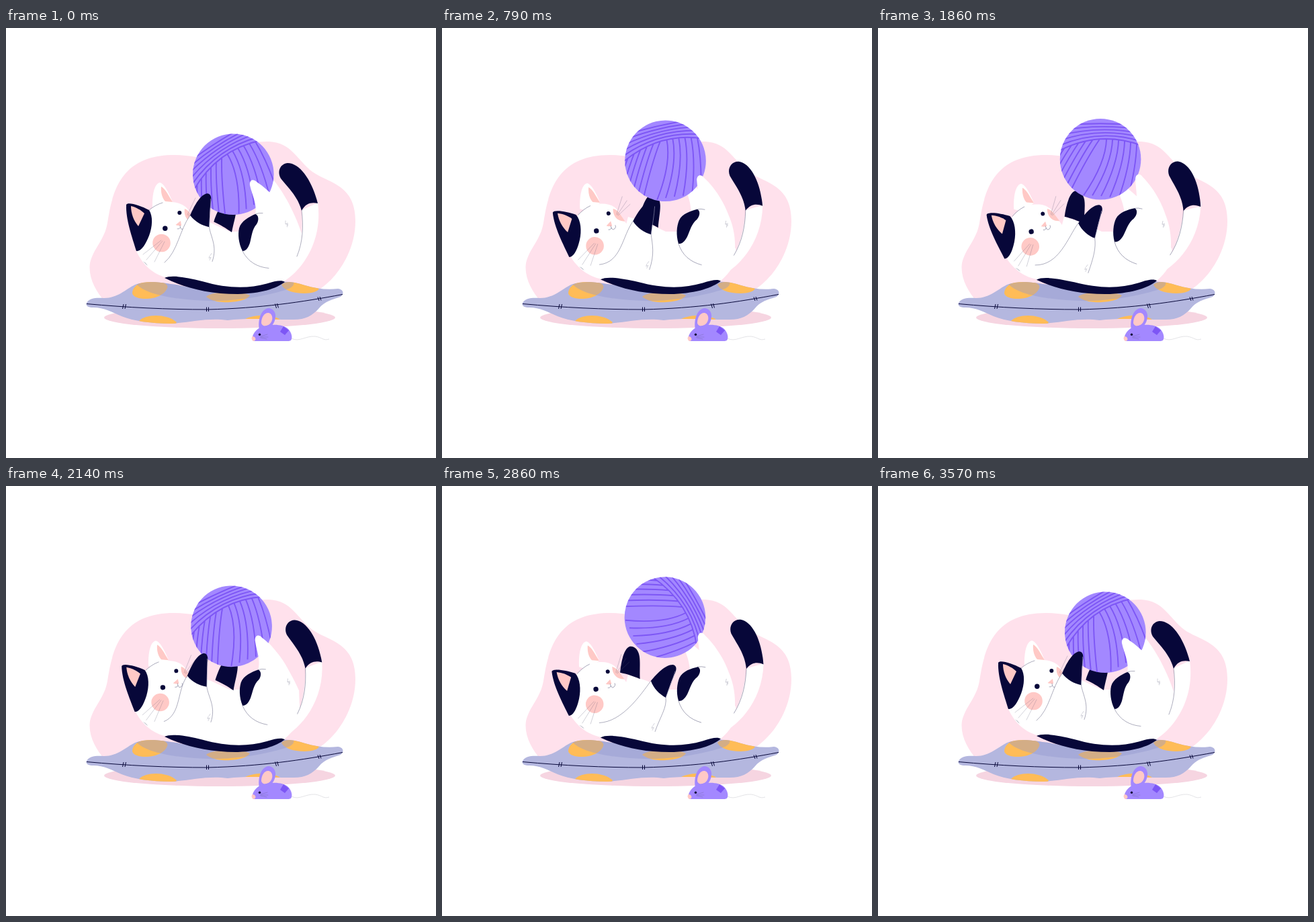
These frames come from a looping animation (640 by 640 pixels, 3.64 s). An HTML page:

```html
<!DOCTYPE html>
<html lang="en">
<head>
<meta charset="utf-8">
<title>Cat with a ball of yarn</title>
<style>
  html, body { margin: 0; width: 100%; height: 100%; overflow: hidden; background: #fff; }
  svg { display: block; width: 100vw; height: 100vh; }
  .navy { fill: #070739; }
  .white { fill: #fff; }
  .pink { fill: #ffc9c6; }
  .lilac { fill: #a388ff; }
  .violet { fill: #7d56f5; }
  .gold { fill: #ffbc57; }
  .line { fill: none; stroke: #070739; stroke-width: .6; stroke-opacity: .55; stroke-linecap: round; }
  .hair { fill: none; stroke: #5b5b78; stroke-width: .6; stroke-opacity: .45; stroke-linecap: round; }
  .seam { fill: none; stroke: #070739; stroke-width: 1; }
  #strands { fill: none; stroke: #7d56f5; stroke-width: 1.9; }
</style>
</head>
<body>
<svg viewBox="0 0 640 640">
  <defs>
    <clipPath id="round"><circle r="60.3"/></clipPath>
    <clipPath id="pillow"><use href="#cushion"/></clipPath>
  </defs>

  <path fill="#ffe1ec" d="M148 408C133 392 122 370 125 350C130 328 147 315 151 290C158 245 170 189 250 189C275 189 290 196 312 190C340 180 360 168 392 169C425 171 432 195 456 214C480 231 520 232 520 288C520 330 495 372 462 392L400 420Z"/>
  <ellipse cx="318" cy="431" rx="172" ry="16" fill="#f6d5e1"/>

  <path id="cushion" fill="#b4b7df" d="M120 409C124 402 134 401 146 402C166 402 178 389 192 382C212 374 236 380 254 382C290 391 350 392 385 383C405 376 425 376 445 383C462 388 478 390 494 388C502 389 504 395 498 400C486 404 474 407 466 417C456 428 446 434 428 434C390 434 360 431 330 435C300 431 276 438 246 440C215 440 190 436 172 429C158 423 146 416 130 416C122 416 118 413 120 409Z"/>
  <g clip-path="url(#pillow)">
    <g class="gold">
      <path d="M188 395C188 384 200 376 218 377C236 377 242 382 240 387C236 398 220 404 204 403C194 402 189 399 188 395Z"/>
      <path d="M298 400C304 392 350 390 363 398C358 406 338 409 322 408C310 407 303 404 298 400Z"/>
      <path d="M410 382C416 374 452 378 466 388C462 395 446 396 432 394C420 392 413 388 410 382Z"/>
      <path d="M198 436C208 425 240 425 254 438L250 444L200 442Z"/>
      <path d="M352 436C362 426 400 424 410 436L408 440Z"/>
    </g>
    <path fill="#9196cd" fill-opacity=".4" d="M194 381C220 374 400 372 428 377C430 384 424 388 412 391C385 399 350 405 318 406C280 407 240 402 216 394C206 390 198 386 194 381Z"/>
  </g>
  <path class="seam" d="M120 410.500C180 416 240 419 300 419C380 417 440 408 501 396.500M175 411L173.500 418M178.500 411L177 418M298.500 415.500V422M301.500 415.500V422M400.500 410.500L402.500 417M403.500 410L405.500 416.500M464 400.500L466 406M467 400L469 405.500"/>

  <path class="white" d="M238 372C290 396 380 396 414 377C432 362 440 345 437 328L400 290L350 303H333L305 290L277 281L272 300L240 300Z"/>

  <g id="farLeg">
    <path class="white" d="M400 345L380 290C389 265 389 250 386 232C386 222 391 219 397 225C412 242 430 275 440 306L438 340Z"/>
  </g>
  <path id="farPaw" class="navy" d="M0 0C0 -12 2 -25 1 -34C0 -44 -6 -50 -13 -49C-22 -46 -27 -25 -29 -11C-18 -8 -10 -5 0 0Z"/>

  <g id="ball">
    <circle r="60.3" class="lilac"/>
    <g clip-path="url(#round)"><path id="strands"/></g>
  </g>

  <g id="nearLeg">
    <path class="white" d="M352 332C346 320 345 307 347 298C350 287 362 281 371 277C374 262 366 248 363 234C362 226 368 224 373 229C390 240 407 258 418 277C428 292 436 312 437 335L400 375L365 350Z"/>
    <path class="navy" d="M371 277C376 278 377 286 373 292C366 300 366 309 363 320C360 329 356 332 352 332C346 320 345 307 347 298C350 287 362 281 371 277Z"/>
    <path class="line" d="M371 277Q376 275 382 275.500M352 332C360 348 374 356 391 357.500"/>
    <path class="hair" d="M416 287L416 292L418 291L418.500 296M419 290L419.500 294"/>
  </g>

  <g id="tail">
    <path class="white" d="M440 271C442 300 440 320 433 340L400 378H412C440 362 472 318 464 260Z"/>
    <path class="navy" d="M440 272C434 250 420 238 409 224C403 214 408 202 419 201C438 201 456 228 464 261C456 259 446 260 440 272Z"/>
    <path class="line" d="M440 272C443 295 442 318 433 340"/>
  </g>

  <g id="head">
    <g id="paleEar">
      <path class="white" d="M218 268C217 245 222 231 229 230C236 232 242 245 248 259L232 272Z"/>
      <path class="pink" d="M231 236C230 246 233 254 237 258L248 259C242 250 238 240 231 236Z"/>
    </g>
    <path class="white" d="M213 271C222 263 234 259 247 259C260 260 270 265 274 276C277 283 281 290 286 302L274 320L250 368L237 371C220 366 204 354 194 332L200 290Z"/>
    <g id="darkEar">
      <path class="navy" d="M179 263C181 258 200 264 213 271C219 280 218 296 213 309C208 322 201 333 194 332C188 312 178 285 179 263Z"/>
      <path class="pink" d="M186 265C194 267 201 271 206 276L197 295C190 287 186 276 186 265Z"/>
    </g>
    <path class="line" d="M213 271C219 266 226 262 233 260"/>
    <circle class="pink" cx="231.500" cy="320" r="13.300"/>
    <path class="pink" d="M266 269C264 280 270 289 281 290C278 284 276 280 274 276Q271 271 266 269Z"/>
    <circle class="navy" cx="236.800" cy="298.200" r="3.700"/>
    <circle class="navy" cx="258.300" cy="275" r="3"/>
    <path class="pink" d="M252.500 293L260 287L261 294Q257 295 252.500 293Z"/>
    <path class="line" d="M259 294L259.500 297Q261 301 264 299Q267 297 266 294M259.500 297Q258 300 255 299"/>
    <path class="hair" d="M231 316L204 337M233 317L209 345M236 318L221 348M270 278L282 253M271 279L288 260M272 280L292 266M205 348L209 352M207 349L210 353"/>
  </g>

  <path id="arm" class="white"/>
  <path id="armLines" class="line"/>
  <g id="nearPaw">
    <path class="navy" d="M277 279C283 266 292 249 303 247C309 247 310 254 308 262C306 275 306 285 305 297C295 295 284 289 277 279Z"/>
    <path fill="none" stroke="#9a9ab8" stroke-width=".6" d="M308 255C308 268 306 285 305 297"/>
  </g>
  <path id="armFur" class="hair" d="M304 340L303 343L306 342L304 346M307 336L305 339"/>
  <path id="belly" class="navy" d="M236 372C246 367 268 371 292 377C330 388 360 388 388 380.500C402 376 411 375 415 378C402 388 380 395 345 396C300 396 264 386 236 372Z"/>

  <path fill="none" stroke="#dcdce0" stroke-width=".8" d="M425 462C436 468 446 458 460 459C470 460 472 466 481 463"/>
  <path class="lilac" d="M377 449C374 434 380 418 391 417C402 418 405 432 395 444Z"/>
  <path class="pink" d="M380 439C380 430 385 423 391 424C398 426 398 436 392 441C387 445 381 444 380 439Z"/>
  <path class="lilac" d="M368 466C364 460 370 450 378 446C392 440 412 440 420 448C425 453 427 461 424 465L421 466Z"/>
  <path class="violet" d="M413 444L421 450L415 457L408 452Z"/>
  <path class="pink" d="M366.500 459Q371 459 371.500 463Q371 466 368 466Q364 463 366.500 459Z"/>
  <circle class="navy" cx="377.500" cy="456.300" r="1.700"/>
  <path class="hair" d="M379 459L389 456M379 460L390 460M379 461L388 463"/>
</svg>

<script>
const $ = id => document.getElementById(id);
const LOOP = 3640, STEPS = 51, CYCLE = 30, SPAN = 29;

// Ball drop below its highest point, and its spin in degrees.
const DROP = [[0, 23], [2, 12.5], [5, 5], [8, 2], [11, .8], [14, 0], [16, .5], [19, 3], [20, 4.5], [25, 19.5], [29, 23]];
const SPIN = [[0, 0], [2, 17], [5, 85], [8, 185], [11, 266], [14, 313], [16, 327], [19, 340], [20, 344], [25, 356], [29, 360]];

// Smooth curve through a small table of keys.
function curve(keys, x) {
  const last = keys.length - 1;
  const slope = j => {
    const a = keys[Math.max(0, j - 1)], b = keys[Math.min(last, j + 1)];
    return (b[1] - a[1]) / (b[0] - a[0]);
  };
  let i = 0;
  while (i < last - 1 && x > keys[i + 1][0]) i++;
  const [x0, y0] = keys[i], [x1, y1] = keys[i + 1];
  const h = x1 - x0, u = (x - x0) / h, v = 1 - u;
  return y0 * v * v * (1 + 2 * u) + y1 * u * u * (1 + 2 * v)
    + h * u * v * (slope(i) * v - slope(i + 1) * u);
}

function windYarn() {
  const R = 62;
  const wrap = i => [7.5 * i - 50, 2.4 * i - 56, 6 * i - 50];
  let d = '';
  for (let i = 0; i < 6; i++) {
    const [l, m, r] = wrap(i);
    d += `M${-R} ${l}Q0 ${m} ${R} ${r}`;
  }
  // The lower strands hang from the last wrap.
  const edge = x => {
    const [l, m, r] = wrap(5), t = (x + R) / (2 * R), u = 1 - t;
    return l * u * u + 2 * m * t * u + r * t * t;
  };
  for (let i = 0; i < 6; i++) {
    const x = -1 - 10.5 * i, y = edge(x);
    d += `M${x} ${y}Q${x - 18} ${y + 26} ${x - 42} ${y + 74}`;
  }
  for (let i = 0; i < 6; i++) {
    const x = 9 + 9 * i, y = edge(x);
    d += `M${x} ${y}Q${x - 1} ${y + 36} ${x - 34 + 4 * i} ${y + 84}`;
  }
  $('strands').setAttribute('d', d);
}

const move = (id, value) => $(id).setAttribute('transform', value);

function pose(f) {
  const w = 2 * Math.PI / SPAN;
  const s = (1 - Math.cos(w * f)) / 2;
  const p = .55 - Math.cos(w * (f - 25.25));

  move('head', `rotate(${-10.3 * s} 260 350)`);
  move('darkEar', `translate(${-3.5 * s} ${-s})`);
  move('paleEar', `translate(0 ${-2 * s}) rotate(${10 * s} 248 260)`);
  move('tail', `translate(0 ${-3 * s}) rotate(${11.2 * s} 430 350)`);
  move('belly', `translate(0 ${-1.5 * s}) rotate(${-1.5 * s} 400 378)`);
  move('nearLeg', `translate(0 ${-14.2 * s}) rotate(${12.3 * s} 352 332)`);
  move('farLeg', `translate(0 ${6 * s}) rotate(${-15 * s} 400 345)`);
  move('farPaw', `translate(${333 - 22 * p - 5 * s} ${303 - 4 * s - 8 * p}) rotate(${9 - 5 * p - 5 * s})`);
  move('ball', `translate(${338.3 - 7.4 * s} ${194.8 + curve(DROP, f)}) rotate(${-33 - curve(SPIN, f)})`);

  const turn = 10 * p, wx = 291 + 20 * p, wy = 288 + 10.5 * s + 3.5 * p;
  move('nearPaw', `translate(${wx - 291} ${wy - 288}) rotate(${turn} 291 288)`);

  // The arm follows both corners of the wrist.
  const a = turn * Math.PI / 180, c = Math.cos(a), n = Math.sin(a);
  const lx = wx - 14 * c + 9 * n, ly = wy - 14 * n - 9 * c;
  const rx = wx + 14 * c - 9 * n, ry = wy + 14 * n + 9 * c;
  const ex = 308 + 7 * p - 2 * s, ey = 348 + 13 * s + 4 * p;
  const left = `C${lx - 16} ${ly + 22} ${256 + 14 * s} ${332 + 22 * s} ${236 - 2 * s} ${349 + 4 * s}`;
  const right = `C${ex + 8} ${ey - 23} ${rx + 2} ${ry + 15} ${rx} ${ry}`;
  $('arm').setAttribute('d', `M${lx} ${ly}${left}L262 368L${ex} ${ey}${right}Z`);
  $('armLines').setAttribute('d', `M${lx} ${ly}${left}M${ex} ${ey}${right}`);
  move('armFur', `translate(${ex - 308} ${ey - 348})`);
}

windYarn();
const start = performance.now();
let shown = -1;

function tick(now) {
  const t = Math.max(0, now - start) % LOOP;
  // The scene is shown at 14 steps a second, moving on a 25 per second clock.
  const step = Math.min(STEPS - 1, Math.floor((t + 5) * 14 / 1000));
  if (step !== shown) {
    shown = step;
    pose(Math.floor(step * 25 / 14) % CYCLE);
  }
  requestAnimationFrame(tick);
}
tick(start);
</script>
</body>
</html>
```
